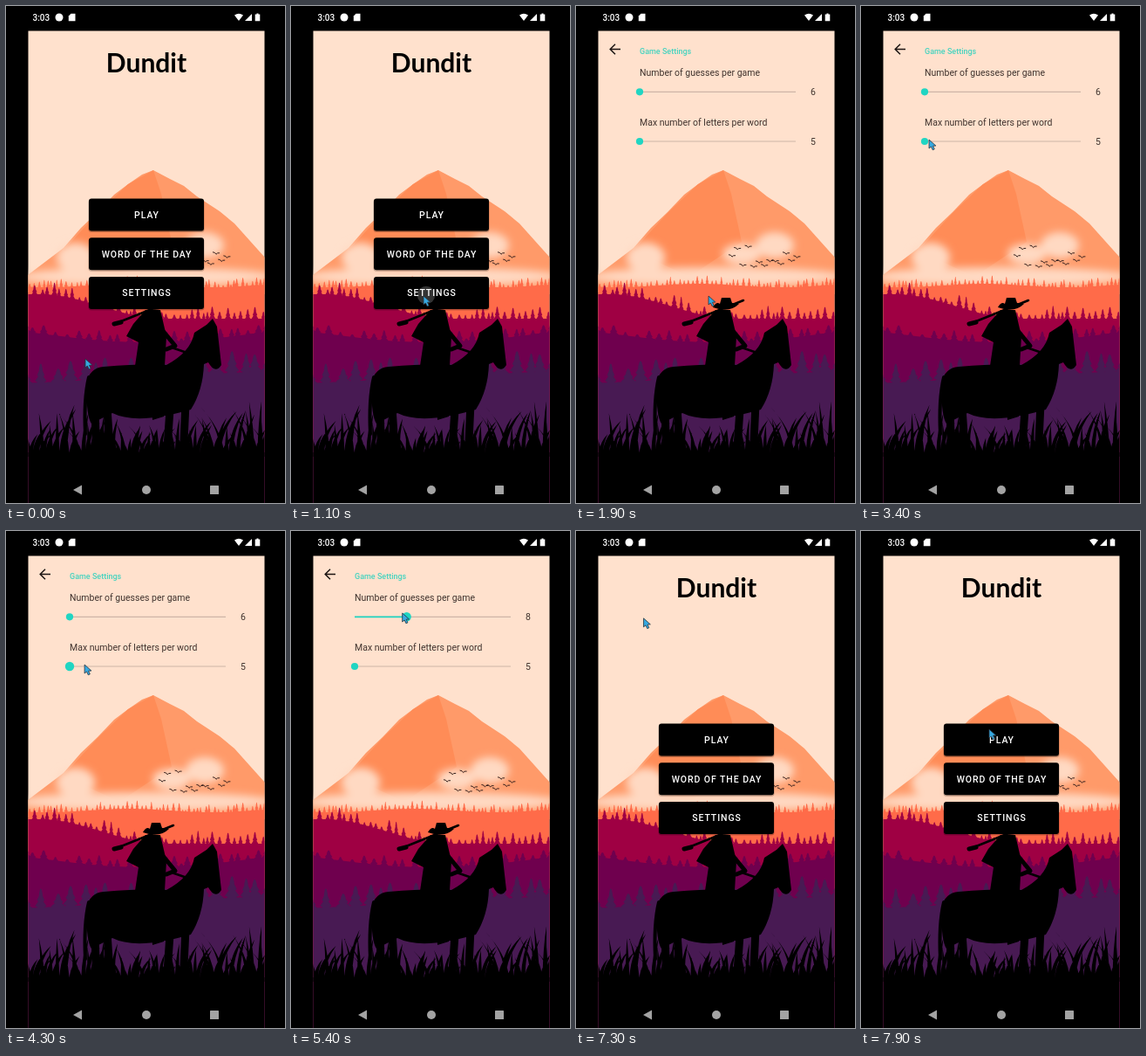
Animation of 320x569 px, one loop 8 s. Source, as an HTML page:

```html
<!DOCTYPE html>
<html lang="en">
<head>
<meta charset="utf-8">
<title>Word game menu</title>
<style>
  html, body { margin: 0; width: 100%; height: 100%; overflow: hidden; background: #000; }
  svg { display: block; width: 320px; height: 569px; font-family: Roboto, sans-serif; font-size: 10.5px; }
  .title { font: 700 30px Lato, sans-serif; }
  .button { font-weight: 500; letter-spacing: .94px; fill: #fff; }
  .mid { text-anchor: middle; }
  .label { fill: #40332e; }
  .heading { font-size: 9px; font-weight: 500; fill: #45d3bf; }
  .line { fill: none; stroke: #000; stroke-linecap: round; stroke-linejoin: round; }
</style>
</head>
<body>
<svg viewBox="0 0 320 569">
  <defs>
    <filter id="blur" x="-30%" y="-60%" width="160%" height="220%"><feGaussianBlur stdDeviation="5"/></filter>
    <clipPath id="screen"><path d="M25.500 28.500H296.500V569H25.500z"/></clipPath>
    <clipPath id="settingsButton"><rect x="95" y="310" width="132" height="37" rx="3"/></clipPath>
  </defs>

  <g clip-path="url(#screen)">
    <path d="M25 28H297V569H25z" fill="#ffe1cd"/>
    <path fill="#ff9a69" d="M25 308L66 277 86 254 105 236 124 216 140 204 156 193 169 188 188 198 204 206 219 218 245 235 262 249 297 288V330H25z"/>
    <path fill="#ff8c57" d="M169 188L140 204 106 236 84 260 66 280 130 310 190 270 178 215z"/>
    <g id="mist" fill="#ffd9c2" filter="url(#blur)"></g>
    <path id="birds" fill="none" stroke="#35211e"/>
    <g id="forest"></g>
    <path d="M25 511H297V569H25z"/>
    <path id="grass"/>
    <path d="M92 432Q96 414 112 413 160 409 184 411 212 396 216 374L230 365 237 358 242 367 247 411Q240 422 232 408L227 410Q226 440 212 462 150 480 122 466L98 478Q92 470 92 432z"/>
    <path class="line" stroke-width="9" d="M102 462L104 520M116 460L120 520M188 462L184 520M206 455L203 520"/>
    <path class="line" stroke-width="4" d="M95 425Q89 450 91 490"/>
    <path d="M160 348L177 348 184 378 182 412 181 470 168 474 165 420 148 412 152 385 138 378 146 364z"/>
    <path d="M157 345Q161 338 165 341L167 334 177 334 179 340 187 341Q176 352 157 345z"/>
    <path class="line" stroke-width="5" d="M180 372L194 389 184 393M124 364L132 362"/>
    <path class="line" stroke-width="2.500" d="M132 361L192 337M190 391L228 404"/>
  </g>

  <g id="menu">
    <text class="title mid" x="161" y="76">Dundit</text>
    <g id="buttons"></g>
    <circle id="ripple" cx="155" cy="331" fill="#fff" clip-path="url(#settingsButton)"/>
  </g>

  <g id="settings">
    <rect id="backGlow" x="34" y="37" width="25" height="25" rx="4"/>
    <path d="M51 49.500H39.500M45 43.700L39.200 49.500 45 55.300" fill="none" stroke="#1c1513" stroke-width="1.500"/>
    <text class="heading" x="73" y="54.500">Game Settings</text>
  </g>

  <g fill="#fff">
    <text x="30.500" y="17" font-weight="500" font-size="10">3:03</text>
    <circle cx="61" cy="13" r="4.500"/>
    <path d="M74.500 8.800H79.500V17.300H71.800V11.500z"/>
    <path d="M262 10.500Q267 6.800 272 10.500L267 17z"/>
    <path d="M282 9V17H274z"/>
    <path d="M287.500 8.500H289.500V9.500H291.300V17.300H285.700V9.500H287.500z"/>
  </g>
  <g fill="#a3a3a3">
    <path d="M87 548.500V559.500L77 554z"/><circle cx="161" cy="554" r="5"/><rect x="234" y="549" width="10" height="10" rx=".6"/>
  </g>
  <path id="cursor" d="M0 0V10L2.400 8 4.200 11.800 6.200 10.900 4.500 7.200 7.800 7z" fill="#36a9e1" stroke="#26323c" stroke-width=".8"/>
</svg>

<script>
const $ = id => document.getElementById(id);
const add = (id, markup) => $(id).insertAdjacentHTML("beforeend", markup);
const clamp = (v, lo, hi) => Math.max(lo, Math.min(hi, v));
const ramp = (v, from, to) => clamp((v - from) / (to - from), 0, 1);
const smooth = p => p * p * (3 - 2 * p);

let seed = 7;
const random = (lo, hi) => {
  seed = (seed * 16807) % 2147483647;
  return lo + (hi - lo) * seed / 2147483647;
};

for (const [x, y, rx, ry] of [[160, 310, 150, 11], [80, 288, 22, 17], [190, 284, 22, 12], [228, 274, 22, 15]]) {
  add("mist", `<ellipse cx="${x}" cy="${y}" rx="${rx}" ry="${ry}"/>`);
}

// A conifer: tiers of branches narrowing towards the tip.
function tree(x, base, height, width) {
  const left = [], right = [];
  for (let i = 0; i < 4; i++) {
    const half = width / 2 * (1 - i / 4), y = base - height * i / 4;
    left.push([x - half, y], [x - half * .45, y - height * .2]);
    right.unshift([x + half * .45, y - height * .2], [x + half, y]);
  }
  return "M" + [...left, [x, base - height], ...right].map(p => p.map(n => n.toFixed(1))).join("L") + "z";
}

function forest(color, ridge, spacing, low, high) {
  let d = "M25 569";
  for (let x = 25; x <= 297; x += 4) d += `L${x} ${ridge(x)}`;
  d += "V569z";
  for (let x = 23; x < 300; x += random(.6, 1.4) * spacing) {
    d += tree(x, ridge(x) + 5, random(low, high) + 5, spacing * random(1.1, 1.6));
  }
  add("forest", `<path d="${d}" fill="${color}"/>`);
}
forest("#ff6b49", x => 320 + 2 * Math.sin(x / 30), 5, 2, 10);
forest("#9f0043", x => 330 + 28 * smooth(ramp(x, 40, 180)), 7, 3, 15);
forest("#6f004e", x => 373 + 12 * Math.sin((x - 25) / 87), 11, 2, 13);
forest("#481a53", x => 433 - x / 20, 15, 4, 26);

let blades = "";
for (let x = 22; x < 300; x += random(1.5, 5)) {
  const height = (34 + 30 * Math.abs(Math.cos((x - 25) / 87))) * random(.4, 1);
  const tip = x + random(-.5, .5) * height;
  blades += `M${x - 2} 516Q${x - 1.5} ${516 - height * .6} ${tip} ${516 - height}Q${x + 2.5} ${516 - height * .5} ${x + 3} 516z`;
}
$("grass").setAttribute("d", blades);

let flock = "";
for (let i = 0; i < 13; i++) {
  const x = 179 + i * 6.2, y = 288 + random(-14, 14) * (1 - i / 40);
  flock += `M${x - 4} ${y - 1.5}Q${x - 1} ${y - 1.5} ${x} ${y + 1}Q${x + 1} ${y - 1} ${x + 4} ${y - .5}`;
}
$("birds").setAttribute("d", flock);

["PLAY", "WORD OF THE DAY", "SETTINGS"].forEach((name, i) => {
  const y = 220.5 + i * 44.7;
  add("buttons", `
    <rect x="94.500" y="${y + 1}" width="133" height="37.500" rx="3.500" opacity=".25"/>
    <rect x="95" y="${y}" width="132" height="37" rx="3"/>
    <text class="button mid" x="161.500" y="${y + 22.3}">${name}</text>`);
});

function slider(label, y, min, max) {
  add("settings", `<g>
    <text class="label" x="73" y="${y - 18.5}">${label}</text>
    <path d="M73 ${y}H252" stroke="#cdb5a7" stroke-width="1.200"/>
    <path stroke="#20d5c2" stroke-width="1.800"/>
    <circle cy="${y}" fill="#20d5c2"/>
    <text class="label mid" x="272" y="${y + 4}"></text></g>`);
  const [, , fill, thumb, value] = $("settings").lastElementChild.children;
  const step = 179 / (max - min);
  return (pointer, pressed) => {
    const steps = pressed ? clamp(Math.round((pointer - 73) / step), 0, max - min) : 0;
    const x = 73 + steps * step;
    fill.setAttribute("d", `M73 ${y}H${x}`);
    thumb.setAttribute("cx", x);
    thumb.setAttribute("r", pressed ? 5.2 : 4.1);
    value.textContent = min + steps;
  };
}
const guesses = slider("Number of guesses per game", 98.3, 6, 12);
const letters = slider("Max number of letters per word", 155, 5, 10);

// Pointer stops: time, x, y.
const stops = [[0, 91, 404], [800, 152, 332], [2200, 152, 332], [3200, 87, 153], [3500, 75, 153], [4000, 190, 153],
  [4400, 72, 153], [4750, 74, 94], [5100, 185, 94], [5700, 71, 94], [6000, 71, 94], [6500, 53, 55], [7050, 53, 55], [7800, 147, 227]];

function pointerAt(t) {
  const next = stops.findIndex(s => s[0] > t);
  if (next < 0) return stops[stops.length - 1].slice(1);
  const [start, x, y] = stops[next - 1], [end, toX, toY] = stops[next];
  const p = smooth(ramp(t, start, end));
  return [x + (toX - x) * p, y + (toY - y) * p];
}

function draw() {
  const t = performance.now() % 8000;
  const [x, y] = pointerAt(t);
  const press = ramp(t, 1050, 1300);
  $("cursor").setAttribute("transform", `translate(${x} ${y})`);
  $("menu").setAttribute("opacity", 1 - ramp(t, 1350, 1900) + ramp(t, 6950, 7250));
  $("settings").setAttribute("opacity", ramp(t, 1450, 1850) - ramp(t, 7000, 7250));
  $("ripple").setAttribute("r", 50 * press);
  $("ripple").setAttribute("opacity", .2 * (1 - ramp(t, 1200, 1600)));
  $("backGlow").setAttribute("opacity", .1 * ramp(t, 6650, 6800));
  letters(x, t > 3500 && t < 4400);
  guesses(x, t > 4750 && t < 5700);
  requestAnimationFrame(draw);
}
draw();
</script>
</body>
</html>
```
